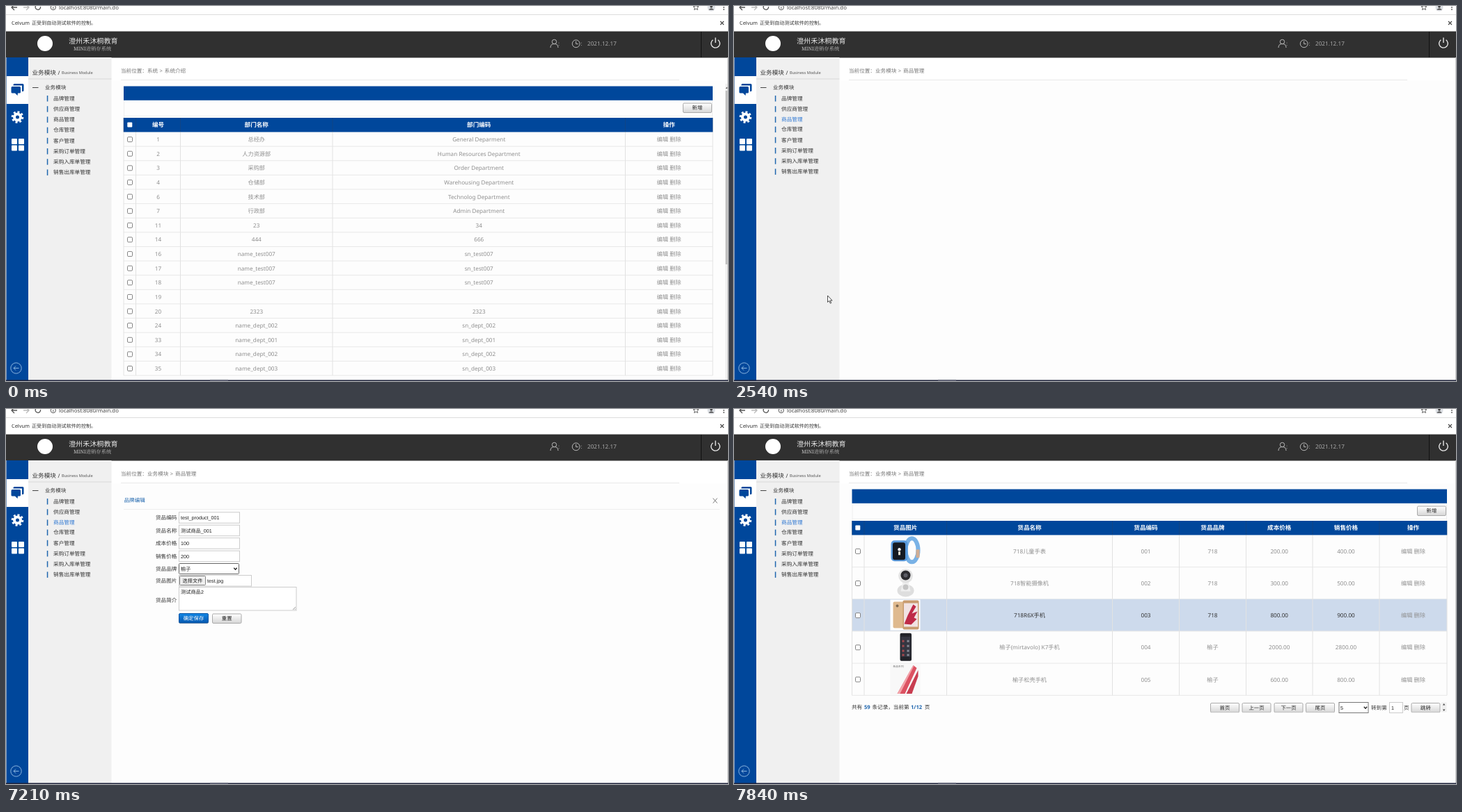
Animation of 1037x540 px, one loop 8.77 s. Source, as an HTML page:

```html
<!DOCTYPE html>
<html>
<head>
<meta charset="utf-8">
<title>进销存系统</title>
<style>
html, body { margin: 0; width: 100%; height: 100%; overflow: hidden; background: #fff; }
svg { display: block; width: 100vw; height: 100vh; }
text { font-family: "Noto Sans", "Noto Sans CJK SC", "Noto Sans CJK JP", sans-serif; text-rendering: geometricPrecision; white-space: pre; }
.arial { font-family: "Liberation Sans", "Noto Sans CJK SC", "Noto Sans CJK JP", sans-serif; }
.mono { font-family: "Liberation Mono", "Noto Sans CJK SC", "Noto Sans CJK JP", monospace; }
.serif { font-family: "Noto Serif", "Noto Serif CJK SC", "Noto Sans CJK SC", serif; }
.row { fill: #8f8f8f; }
.row .bg { fill: none; }
.row.hover { fill: #333; }
.row.hover .bg { fill: #cddaec; }
.active { fill: #2f78d2; }
</style>
</head>
<body>
<svg id="stage" viewBox="0 0 1037 540" preserveAspectRatio="none"></svg>
<script>
const LOOP = 8770, BLUE = '#00479b', LINK = '#1f66ae';
const MID = 'text-anchor="middle"';

const rect = (x, y, w, h, fill, extra = '') =>
  `<rect x="${x}" y="${y}" width="${w}" height="${h}" fill="${fill}" ${extra}/>`;
const circle = (x, y, r, fill, extra = '') => `<circle cx="${x}" cy="${y}" r="${r}" fill="${fill}" ${extra}/>`;
const path = (d, stroke, width = 1, extra = '') =>
  `<path d="${d}" fill="none" stroke="${stroke}" stroke-width="${width}" ${extra}/>`;
const shape = (d, fill) => `<path d="${d}" fill="${fill}"/>`;
// y is the visual middle of the line of text; an empty fill inherits
const text = (x, y, s, size = 7.6, fill = '#333', extra = '') =>
  `<text x="${x}" y="${y + size * 0.37}" font-size="${size}" ${fill && `fill="${fill}"`} ${extra}>${s}</text>`;
const group = (id, body, extra = '') => `<g id="${id}" ${extra}>${body}</g>`;
const box = (x, y, w, h, stroke = '#ccc', extra = '') => rect(x + .5, y + .5, w - 1, h - 1, '#fff', `stroke="${stroke}" ${extra}`);
const checkbox = y => rect(174.5, y - 3.5, 7, 7, '#fff', 'rx="1.3" stroke="#767676" stroke-width=".9"');
const button = (x, y, label, w = 42, fill = 'url(#grey)', color = '#222', stroke = '#aaa') =>
  rect(x + .5, y + .5, w - 1, 13.5, fill, `rx="1.5" stroke="${stroke}"`) +
  text(x + w / 2, y + 7.2, label, 7.4, color, MID);
const chevron = (x, y) => path(`M${x - 2.2} ${y - 1.2}l2.2 2.4 2.2-2.4`, '#222', 1.3);

const defs = `<defs>
  <linearGradient id="grey" x2="0" y2="1"><stop stop-color="#fff"/><stop offset="1" stop-color="#d6d6d6"/></linearGradient>
  <linearGradient id="save" x2="0" y2="1"><stop stop-color="#1286e4"/><stop offset="1" stop-color="#0558b0"/></linearGradient>
  <linearGradient id="caption" x2="0" y2="1"><stop stop-color="#82b6e4"/><stop offset="1" stop-color="#3f84c4"/></linearGradient>
  <filter id="shadow" x="-30%" y="-30%" width="160%" height="160%"><feDropShadow dx="0" dy="2" stdDeviation="4" flood-opacity=".6"/></filter>
</defs>`;

function browserBar() {
  return path('M16 2H8.5m3.5-4-4 4 4 4', '#555', 1.3) +
    path('M25 2h7.5m-3.5-4 4 4-4 4', '#bbb', 1.3) +
    path('M49.5 1a3.7 3.7 0 1 1-1-2', '#555', 1.3) +
    circle(67.8, 2, 3.6, 'none', 'stroke="#555"') + rect(67.3, 1.2, 1, 3, '#555') +
    text(76, 2, 'localhost:8080/main.do', 7.8, '#444') +
    path('M991-2l1.1 2.6 2.9.2-2.2 1.9.7 2.8-2.5-1.5-2.5 1.5.7-2.8-2.2-1.9 2.9-.2z', '#555', .9) +
    circle(1013, 2, 5.5, '#dcdfe4') + circle(1013, 1, 1.8, '#444') + shape('M1009 5.5q4-4 8 0z', '#444') +
    circle(1031, 2, .9, '#555') + circle(1031, 5, .9, '#555') +
    path('M0 12.5H1037', '#dcdcdc') +
    text(8, 24, 'Celvum', 7.4) + rect(7, 17, 29, 5, '#fff') +
    text(37, 24, '正受到自动测试软件的控制。', 7.1) +
    path('M1026 22l5 5m0-5-5 5', '#444', 1.1);
}

function header() {
  return rect(0, 36.5, 1037, 38, '#303030') + circle(56, 54, 11, '#fff') +
    text(90, 50.5, '澄州禾沐桐教育', 10.1, '#e8e8e8', 'font-weight="500"') +
    text(97, 61.5, 'MINI进销存系统', 7.3, '#c4c4c4', 'class="serif"') +
    circle(787.5, 51.5, 3.2, 'none', 'stroke="#bbb"') + path('M782 60q0-5.5 5.5-5.5t5.5 5.5', '#bbb') + text(793, 54, ':', 8, '#aaa') +
    circle(818.7, 54.3, 5.4, 'none', 'stroke="#bbb"') + path('M818.7 50.8v3.8h3', '#bbb') + text(825.5, 54, ':', 8, '#aaa') +
    text(835, 54, '2021.12.17', 8.2, '#aaa') +
    path('M998.5 37V74', '#111') +
    path('M1015.4 48.7a6.3 6.3 0 1 0 7.2 0M1019 45.5v7.5', '#e8e8e8', 1.4);
}

const menuItems = ['品牌管理', '供应商管理', '商品管理', '仓库管理', '客户管理', '采购订单管理', '采购入库单管理', '销售出库单管理'];

function sidebar() {
  const item = (label, i) => {
    const y = 133 + i * 15.2;
    return rect(58.8, y - 4, 1.5, 8.5, LINK) + text(68, y, label, 7.65, '', i === 2 ? 'id="current"' : '');
  };
  const items = menuItems.map(item);
  return rect(0, 74, 32, 465, BLUE) + rect(32, 74, 119.5, 465, '#f0f0f0') + rect(1, 101, 31, 40, '#fff') +
    shape('M12 112h12q1.5 0 1.5 1.5v8q0 1.5-1.5 1.5h-1v-8.5H10.500v-1q0-1.500 1.500-1.500z', BLUE) +
    shape('M9 116h10.500q1.500 0 1.500 1.500v6.500q0 1.500-1.500 1.500H17l-.5 3.500-3.500-3.500H9q-1.500 0-1.500-1.500v-6.500q0-1.500 1.500-1.500z', BLUE) +
    circle(16.5, 160, 4.5, 'none', 'stroke="#fff" stroke-width="4"') +
    circle(16.5, 160, 7.3, 'none', 'stroke="#fff" stroke-width="3" pathLength="16" stroke-dasharray="1"') +
    [[8, 191], [18, 191], [8, 200.5], [18, 200.5]].map(([x, y]) => rect(x, y, 8, 8, '#fff', 'rx="1"')).join('') +
    circle(14.5, 521.5, 7.7, 'none', 'stroke="#8fb6e0"') + path('M18.500 521.500h-7.500m3-3-3 3 3 3', '#8fb6e0') +
    text(37.5, 95.5, '业务模块', 8.6) + text(74.5, 95.8, '/', 8) + text(80, 96.3, 'Business Module', 5.6, '#555') +
    path('M32 105H151.5', '#d9d9d9') + path('M38 117.500h8.500', '#444') + text(56, 117.3, '业务模块') +
    `<g fill="#333">${items.slice(0, 3).join('')}${group('lowerItems', items.slice(3).join(''))}</g>`;
}

const crumbs = (id, first, second, x) =>
  group(id, text(203, 93.5, first, 7.6, '#777') + text(x, 93.5, '&gt;', 7.6, '#777') + text(x + 7.3, 93.5, second, 7.6, '#777'));

function table(cols, heads, rowHeight, rows, name) {
  const left = cols[0], width = cols[cols.length - 1] - left, end = left + width;
  const center = i => (cols[i] + cols[i + 1]) / 2;
  const bottom = 181.5 + rows.length * rowHeight;
  let out = rect(left, 115.5, width, 20.3, BLUE) + path(`M${left + .5} 136V161M${end - .5} 136V161M${left} 158.500H${end}`, '#eee') +
    button(end - 43, 139.5, '新增') + rect(left, 161, width, 20.5, BLUE) +
    rect(174.3, 167.5, 7, 7, '#fff', 'rx="1"');
  heads.forEach((h, i) => out += text(center(i + 1), 171.3, h, 8.6, '#fff', MID + ' font-weight="900"'));
  rows.forEach((cells, r) => {
    const top = 181.5 + r * rowHeight, y = top + rowHeight / 2 + .3;
    out += `<g class="row" id="${name}${r}">` + rect(left, top, width, rowHeight, '#fff', 'class="bg"') +
      path(`M${left} ${top + rowHeight}H${end}`, '#e8e8e8') + checkbox(y) +
      cells.map((c, i) => text(center(i + 1), y, c, 8.2, '', MID)).join('') +
      text(center(cols.length - 2), y, '编辑 删除', 8.2, '#8f8f8f', MID) + '</g>';
  });
  cols.forEach(x => out += path(`M${x} 181.500V${bottom}`, '#e2e2e2') + path(`M${x} 161V181.500`, '#1b4378', .6));
  return out;
}

function departments() {
  const rows = [
    [1, '总经办', 'General Deparment'], [2, '人力资源部', 'Human Resources Department'],
    [3, '采购部', 'Order Department'], [4, '仓储部', 'Warehousing Department'],
    [6, '技术部', 'Technolog Department'], [7, '行政部', 'Admin Department'],
    [11, '23', '34'], [14, '444', '666'],
    ...[16, 17, 18].map(n => [n, 'name_test007', 'sn_test007']),
    [19, '', ''], [20, '2323', '2323'],
    [24, 'name_dept_002', 'sn_dept_002'], [33, 'name_dept_001', 'sn_dept_001'],
    [34, 'name_dept_002', 'sn_dept_002'], [35, 'name_dept_003', 'sn_dept_003']
  ];
  return table([169, 186.5, 250.5, 469, 889.5, 1015], ['编号', '部门名称', '部门编码', '操作'], 20.62, rows, 'dept') +
    rect(1033, 112, 4, 427, '#f1f1f1') + rect(1033.5, 122, 3, 250, '#bdbdbd') + shape('M1033.500 119l1.800-2.500 1.800 2.500z', '#666');
}

const pictures = [
  `<ellipse cx="9" cy="-1" rx="9" ry="17" fill="none" stroke="#79b2e6" stroke-width="6"/>` + rect(15, -2, 5, 12, '#d0ad94', 'rx="1"') +
    rect(-21, -15, 24, 30, '#5799dc', 'rx="5"') + rect(-18.5, -12, 18, 25, '#141a22', 'rx="3"') +
    circle(-9, -2, 2.2, '#fff') + rect(-10.5, 1, 3, 5, '#e9e2d0'),
  `<ellipse cx="0" cy="11" rx="12" ry="9" fill="#dedede"/>` + shape('M-4-2h8l3 14h-14z', '#efefef') + circle(0, 6, 4, '#c4c4c4') +
    circle(0, -10, 10.3, '#e3e3e3') + circle(0, -11, 7, '#2c2c30') + circle(0, -11, 3, '#5c5d66'),
  rect(-22, -22, 43, 44, '#fff') + rect(-18, -19, 22, 38, '#dfb98e', 'rx="2"') + circle(-12, -13, 2, '#7d6850') +
    rect(-4, -21, 23, 42, '#c99c70', 'rx="2"') + rect(-2.5, -17, 20, 34, '#f1e3e3') +
    shape('M-2 13Q3-1 11-15l4 3-6 10 8-3-5 9 4 2-8 8z', '#bf2b48'),
  rect(-8, -20, 16.5, 40, '#222329', 'rx="2"') + rect(-6.5, -15, 13.5, 29, '#353641') +
    [-10, -3, 4, 10].map(y => rect(-5, y, 3, 3, '#a4474c') + rect(2, y, 3, 3, '#858994')).join(''),
  rect(-22, -22, 43, 44, '#f8f8f8') + text(-18, -18, '新品系列', 3.8, '#777') +
    shape('M-12 21 11-20l5 4L-1 21z', '#dc5262') + shape('M-12 21 11-20l1 1L-8 21z', '#f3a4aa') + shape('M1 21 18-13v9L9 21z', '#c83d50')
];

function productList() {
  const rows = [
    ['', '718儿童手表', '001', '718', '200.00', '400.00'],
    ['', '718智能摄像机', '002', '718', '300.00', '500.00'],
    ['', '718R6X手机', '003', '718', '800.00', '900.00'],
    ['', '榆子(mirtavolo) K7手机', '004', '榆子', '2000.00', '2800.00'],
    ['', '榆子松壳手机', '005', '榆子', '600.00', '800.00']
  ];
  const heads = ['货品图片', '货品名称', '货品编码', '货品品牌', '成本价格', '销售价格', '操作'];
  const bold = 'font-weight="bold"';
  return table([169.5, 187, 305.5, 543.5, 639.5, 735.5, 831, 927, 1024], heads, 46.15, rows, 'product') +
    pictures.map((p, i) => group('picture' + i, p, `transform="translate(246.500 ${204.3 + i * 46.15})"`)).join('') +
    text(169, 428.7, '共有') + text(187, 428.7, '58', 7.6, LINK, bold + ' id="total"') + text(198.5, 428.7, '条记录，当前第') +
    text(254, 428.7, '1/12', 7.6, LINK, bold) + text(273.8, 428.7, '页') +
    [[684, '首页'], [729.5, '上一页'], [775.5, '下一页'], [821, '尾页'], [972.5, '跳转']].map(([x, s]) => button(x, 423, s)).join('') +
    box(868.5, 422, 43, 16, '#777') + text(871, 430, '5', 7.2, '#222', 'class="arial"') + chevron(907, 430) +
    text(915, 430, '转到第') + box(941, 422, 20, 16) + text(944, 430, '1', 7.2, '#222', 'class="arial"') + text(962, 430, '页') +
    rect(1016, 422.5, 7.5, 14, '#f0f0f0') + shape('M1018 426.500l1.700-2.500 1.700 2.500zM1018 432.500l1.700 2.500 1.700-2.500z', '#444') +
    rect(683, 437.2, 185, 2, '#fff') + rect(972, 437.2, 52, 2, '#fff');
}

// label, y, time typed, value, caret x
const inputs = [
  ['货品编码', 156.5, 3170, 'test_product_001', 307.4],
  ['货品名称', 175, 3780, '测试商品_001', 296.4],
  ['成本价格', 193.5, 4330, '100', 263.6],
  ['销售价格', 212, 4880, '200', 263.6],
  ['货品简介', 263.5, 6660, '测试商品2', 284.8]
];

function form() {
  const arial = 'class="arial"';
  let out = text(169.5, 131.5, '品牌编辑', 7.6, LINK, 'font-weight="500"') + path('M1015.500 128.500l6 7m0-7-6 7', '#777') + path('M169 144.500H1025', '#eee') +
    box(248, 256, 169.5, 34.5) + path('M412 289l4-4m-1.500 4 1.500-1.500', '#777', .7);
  inputs.forEach(([label, y, , value, caret], i) => {
    const memo = i === 4;
    out += text(215, memo ? 274.8 : y, label) + (memo ? '' : box(248, y - 8.3, 88, 16.5)) +
      text(251, y, value, 7.2, '#222', `id="value${i}" class="${memo ? 'mono' : 'arial'}"`) +
      rect(caret, y - 4.2, .8, 8.4, '#111', `id="caret${i}"`);
  });
  return out + text(215, 230, '货品品牌') + box(248, 222, 87, 16, '#666', 'id="brandBox" rx="1"') +
    text(251, 230, '蓝杉', 7.2, '#222', 'id="brand" class="arial"') + chevron(329.5, 230) +
    text(215, 247.5, '货品图片') + box(248, 239, 105, 16.5) +
    rect(249.5, 240.5, 37, 13, '#efefef', 'rx="1" stroke="#767676" stroke-width=".9"') + text(268, 247, '选择文件', 7.2, '#222', MID) +
    text(289, 247, '未选择任何文件', 7.2, '#222', `id="file" ${arial}`) +
    button(248, 294.5, '确定保存', 43) + button(296, 294.5, '重置', 42.5) +
    group('saveHot', button(248, 294, '确定保存', 43, 'url(#save)', '#fff', '#0a56a5'));
}

function dialog() {
  return rect(151.5, 112, 885, 427, '#000', 'fill-opacity=".7"') +
    rect(560, 246, 74, 76, '#f6f7f8', 'rx="2" filter="url(#shadow)"') +
    rect(560, 246, 74, 16.5, 'url(#caption)', 'rx="2"') + text(565, 254.5, '温馨提示', 6.8, '#fff', 'font-weight="bold"') +
    text(597, 280.5, '保存成功', 7.6, '#222', MID) +
    rect(601.5, 301, 25.5, 14.5, '#2496dd', 'rx="2" stroke="#1b7fc0" stroke-width=".7"') +
    text(614.3, 308.5, '确定', 7.4, '#fff', MID + ' font-weight="500"');
}

const stage = document.getElementById('stage');
stage.innerHTML = defs + rect(0, 0, 1037, 540, '#fff') + rect(151.5, 107, 885, 432, '#fdfdfd') +
  browserBar() + header() + sidebar() +
  text(165, 93.5, '当前位置：', 7.6, '#777') + path('M165 106.500H967', '#e9e9e9') +
  crumbs('deptCrumbs', '系统', '系统介绍', 220.5) + crumbs('productCrumbs', '业务模块', '商品管理', 235.8) +
  group('departments', departments()) + group('list', productList()) + group('form', form()) + group('dialog', dialog()) +
  path('M.500 74V540', '#7f9cc0') + path('M1036.500 74V540', '#cfcfcf') + rect(0, 538.5, 1037, 1.5, '#20243c') + rect(293, 538.5, 26, 1.5, '#5d6073') +
  group('pointer', '<path d="M0 0V9.500l2.200-2 1.600 3.700 1.400-.6-1.600-3.500h3z" fill="#fff" stroke="#222" stroke-width=".8"/>');

const el = id => document.getElementById(id);
const show = (id, on) => el(id).style.display = on ? '' : 'none';
const between = (t, a, b) => t >= a && t < b;

function pointerPosition(t) {
  if (t < 1290) {
    const p = Math.min(1, (t - 830) / 380), k = 1 - (1 - p) ** 2;
    return [43 + 91.5 * k, 528 - 111 * k];
  }
  const steps = t < 4090 ? 0 : Math.min(3, Math.floor((t - 4090) / 80) + 1);
  return [134.5 - steps * 15.4, 417 + steps * 31];
}

function render(t) {
  const products = t >= 370, saved = t >= 7840;
  show('departments', !products);
  show('deptCrumbs', !products);
  show('productCrumbs', products);
  el('current').classList.toggle('active', products);
  el('lowerItems').setAttribute('transform', `translate(0 ${products ? -1 : 0})`);

  show('list', between(t, 600, 2540) || saved);
  pictures.forEach((_, i) => show('picture' + i, t >= 680 + i * 40));
  el('total').textContent = saved ? 59 : 58;
  el('product2').classList.toggle('hover', saved);

  show('form', between(t, 2610, 7840));
  inputs.forEach(([, , start], i) => {
    show('value' + i, t >= start);
    show('caret' + i, between(t, start, start + 530));
  });
  el('brand').textContent = t < 5500 ? '蓝杉' : '榆子';
  el('brandBox').setAttribute('stroke', between(t, 5500, 6660) ? '#111' : '#666');
  el('file').textContent = t < 6050 ? '未选择任何文件' : 'test.jpg';
  show('saveHot', between(t, 7210, 7440));

  show('dialog', between(t, 7440, 7840));
  el('dialog').setAttribute('opacity', t < 7525 ? .35 : t < 7610 ? .7 : 1);

  show('pointer', between(t, 830, 4330));
  el('pointer').setAttribute('transform', `translate(${pointerPosition(t)})`);
}

const start = performance.now();
function frame() {
  render((performance.now() - start) % LOOP);
  requestAnimationFrame(frame);
}
frame();
</script>
</body>
</html>
```
